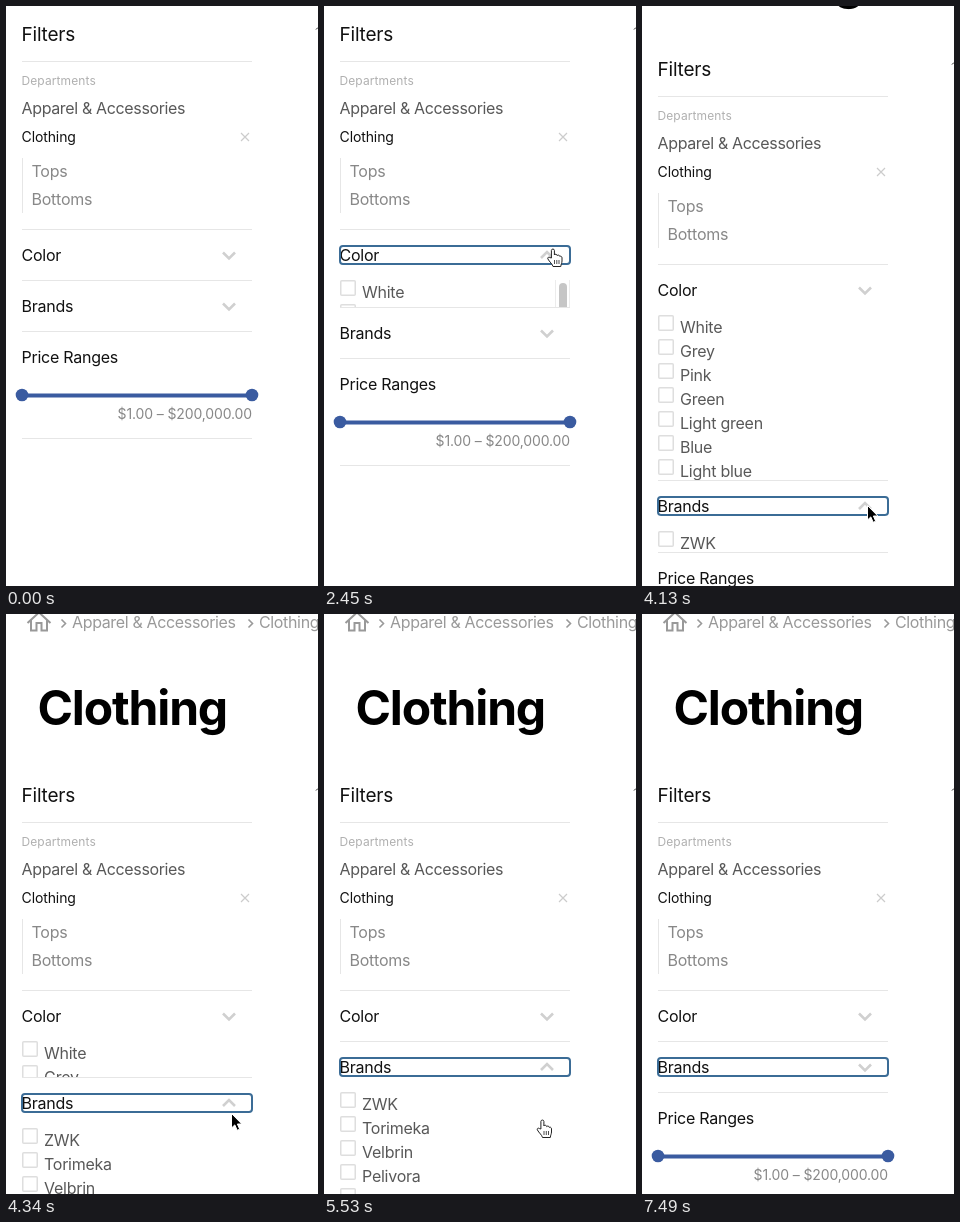
These frames come from a looping animation (312x580 px, 7.56 s). An HTML page:

```html
<!DOCTYPE html>
<html lang="en">
<head>
<meta charset="utf-8">
<title>Filters</title>
<style>
  html, body { margin: 0; width: 100%; height: 100%; overflow: hidden; background: #fff; }
  #stage { display: block; width: 312px; height: 580px; }
  text { font: 16px Inter, "Open Sans", sans-serif; letter-spacing: -.25px; fill: #111; }
  .title { font-size: 48px; font-weight: 700; letter-spacing: -1.15px; fill: #000; }
  .heading { font-size: 19px; letter-spacing: -.2px; }
  .caption { font-size: 12px; letter-spacing: .1px; fill: #b0b0b0; }
  .current { font-size: 14px; letter-spacing: -.1px; }
  .crumb { fill: #999; letter-spacing: -.35px; }
  .link, .item { fill: #585858; }
  .link { letter-spacing: -.35px; }
  .child { fill: #888; }
  .range { font-size: 14px; letter-spacing: -.13px; fill: #888; text-anchor: end; }
  .rule { stroke: #e6e6e6; }
  .icon { fill: none; stroke: #999; stroke-width: 2; }
  .chevron { fill: none; stroke: #d0d0d0; stroke-width: 2.6; }
  .box { fill: #fff; stroke: #dedede; stroke-width: 1.5; }
  .focus { fill: none; stroke: #3b6c96; stroke-width: 2; }
  .slider { fill: #3a5ba0; }
</style>
</head>
<body>
<svg id="stage" viewBox="0 0 312 580">
  <g id="page">
    <g class="icon">
      <path d="M21.5-144 33-154.500 44.500-144M25-147V-136.500H30.500V-144H35.500V-136.500H41V-147"/>
      <path d="M55.500-147.500 59.500-143.500 55.500-139.500M242.500-147.500 246.500-143.500 242.500-139.500" stroke-width="1.6"/>
    </g>
    <text class="crumb" x="66" y="-139">Apparel &amp; Accessories</text>
    <text class="crumb" x="253" y="-139">Clothing</text>
    <text class="title" x="31.500" y="-42">Clothing</text>

    <text class="heading" x="15.500" y="35">Filters</text>
    <path d="M310 23.500 312 21.500" stroke="#222"/>
    <path class="rule" d="M16 55.500H246M16.500 152V207M16 223.500H246"/>
    <text class="caption" x="15.500" y="79">Departments</text>
    <text class="link" x="15.500" y="108">Apparel &amp; Accessories</text>
    <text class="current" x="15.500" y="136">Clothing</text>
    <path d="M235 127 243 135M243 127 235 135" stroke="#ccc" stroke-width="1.2"/>
    <text class="child" x="25.500" y="171">Tops</text>
    <text class="child" x="25.500" y="199">Bottoms</text>

    <g id="color"></g>
    <g id="brands"></g>

    <g id="price">
      <text x="15.500" y="357">Price Ranges</text>
      <g class="slider">
        <rect x="16" y="387.500" width="230" height="4"/>
        <circle cx="16" cy="389" r="6.300"/>
        <circle cx="246" cy="389" r="6.300"/>
      </g>
      <text class="range" x="246" y="413">$1.00 – $200,000.00</text>
      <path class="rule" d="M16 432.500H246"/>
    </g>
  </g>
  <circle id="press" fill="none" stroke="#555" stroke-width="2" opacity=".4"/>
  <g id="cursor">
    <path id="arrow" d="M0 0V14.500L3.300 11.400 5.700 16.800 8.200 15.700 5.900 10.500H10.300Z" fill="#000" stroke="#fff"/>
    <g id="hand" stroke="#222" stroke-linejoin="round">
      <path fill="#fff" d="M-1.600 9V1.400C-1.600-.4 1.400-.4 1.400 1.400V6C1.800 4.800 4 5 4.200 6.600 4.800 5.700 6.600 6 6.800 7.400 7.600 6.800 9 7.400 9 8.800V12C9 14 8 15 7.800 17.500H0C-.5 15-3.500 13-5.200 9.800-5.800 8.400-4 7.600-3 8.600Z"/>
      <path d="M1.500 11V15M3.800 11V15M6 11V15" stroke-width=".8"/>
    </g>
  </g>
</svg>
<script>
const LOOP = 7560, STEP = 70;
const LIST_HEIGHT = 200, MAX_HEIGHT = 1000, DURATION = 1000, SCROLL_MAX = 153;
const COLOR_OPEN = 2345, SWITCH = 4038, BRANDS_CLOSE = 6132;
const COLOR_FOCUS = 2240, BRANDS_FOCUS = 3920;

const $ = id => document.getElementById(id);
const clamp = v => Math.min(1, Math.max(0, v));
const show = (el, on) => el.setAttribute('display', on ? 'inline' : 'none');
const move = (el, x, y) => el.setAttribute('transform', `translate(${x} ${y})`);

// Builds a collapsible section whose header is centred on y.
function buildSection(id, label, y, items, extra = '') {
  const rows = items.map((name, i) => `
    <rect class="box" x="16.75" y="${i * 24 + 0.75}" width="14.5" height="14.5" rx="1"/>
    <text class="item" x="38" y="${i * 24 + 18}">${name}</text>`).join('');
  const root = $(id);
  root.innerHTML = `
    <text x="15.5" y="${y + 6}">${label}</text>
    <path class="chevron"/>
    <rect class="focus" x="16" y="${y - 9}" width="230" height="18" rx="3"/>
    <svg x="0" y="${y + 25}" width="312" height="0" overflow="hidden">${rows}${extra}</svg>
    <path class="rule"/>`;
  const [chevron, focus, list, rule] =
    ['.chevron', '.focus', 'svg', '.rule'].map(s => root.querySelector(s));
  return (height, open, focused) => {
    chevron.setAttribute('d', open
      ? `M217 ${y + 3}L223 ${y - 3} 229 ${y + 3}`
      : `M217 ${y - 2.5}L223 ${y + 3.5} 229 ${y - 2.5}`);
    show(focus, focused);
    show(list, height > 0);
    list.setAttribute('height', height);
    rule.setAttribute('d', `M16 ${y + 25.5 + height}H246`);
  };
}

const scrollbar = `
  <g id="scrollbar">
    <path d="M231.5 0V200M245.500 0V200" stroke="#ececec"/>
    <rect x="235" y="3" width="8" height="108" rx="4" fill="#c6c6c6"/>
  </g>`;
const drawColor = buildSection('color', 'Color', 249, ['White', 'Grey', 'Pink', 'Green',
  'Light green', 'Blue', 'Light blue', 'Turquoise', 'Purple'], scrollbar);
const drawBrands = buildSection('brands', 'Brands', 300,
  ['ZWK', 'Torimeka', 'Velbrin', 'Pelivora', '']);

// Max-height grows in-out and shrinks along cubic-bezier(0,1,0,1).
function listHeight(t, openAt, closeAt) {
  const closing = t >= closeAt;
  const p = clamp((t - (closing ? closeAt : openAt)) / DURATION);
  const limit = closing ? (1 - Math.cbrt(p)) ** 3 : (1 - Math.cos(Math.PI * p)) / 2;
  return Math.min(LIST_HEIGHT, Math.round(MAX_HEIGHT * limit));
}

// time, x, y of the pointer tip
const path = [
  [350, 224, 590], [1120, 229, 243], [2660, 229, 243], [2940, 223, 361],
  [3150, 231, 420], [3430, 226, 479], [3710, 225.5, 499.5], [5040, 225.5, 499.5],
  [5250, 225, 518], [5530, 218.5, 506], [5840, 226.5, 453], [6720, 226.5, 453],
  [7140, 226, 590]
];
const handTimes = [[2100, 2700], [3780, 4060], [5110, 6790]];
// start, end, radius
const presses = [[1330, 1400, 22], [2240, 2345, 27], [3920, 4035, 29], [5990, 6132, 29]];
const during = t => ([from, to]) => t >= from && t < to;

function pointer(t) {
  const i = path.findIndex(key => key[0] > t);
  if (i < 1) return [224, 600];
  const [t0, x0, y0] = path[i - 1], [t1, x1, y1] = path[i];
  const p = (t - t0) / (t1 - t0), e = p * p * (3 - 2 * p);
  return [x0 + (x1 - x0) * e, y0 + (y1 - y0) * e];
}

function draw(t) {
  const colorH = listHeight(t, COLOR_OPEN, SWITCH);
  const brandsH = listHeight(t, SWITCH, BRANDS_CLOSE);
  const colorOpen = during(t)([COLOR_OPEN, SWITCH]);
  drawColor(colorH, colorOpen, during(t)([COLOR_FOCUS, BRANDS_FOCUS]));
  show($('scrollbar'), colorOpen);
  drawBrands(brandsH, during(t)([SWITCH, BRANDS_CLOSE]), t >= BRANDS_FOCUS);
  move($('brands'), 0, colorH);
  move($('price'), 0, colorH + brandsH);
  // Scrolling keeps the second header in place until the page top is reached.
  move($('page'), 0, t < SWITCH ? 0 : Math.min(SCROLL_MAX, LIST_HEIGHT - colorH));

  const [x, y] = pointer(t);
  const isHand = handTimes.some(during(t));
  move($('cursor'), x, y);
  show($('hand'), isHand);
  show($('arrow'), !isHand);

  const press = presses.find(during(t));
  show($('press'), press);
  if (press) {
    $('press').setAttribute('r', press[2]);
    move($('press'), x, y + 1);
  }
}

const start = performance.now();
function tick() {
  const t = (performance.now() - start) % LOOP;
  draw(Math.floor(t / STEP) * STEP);
  requestAnimationFrame(tick);
}
tick();
</script>
</body>
</html>
```
